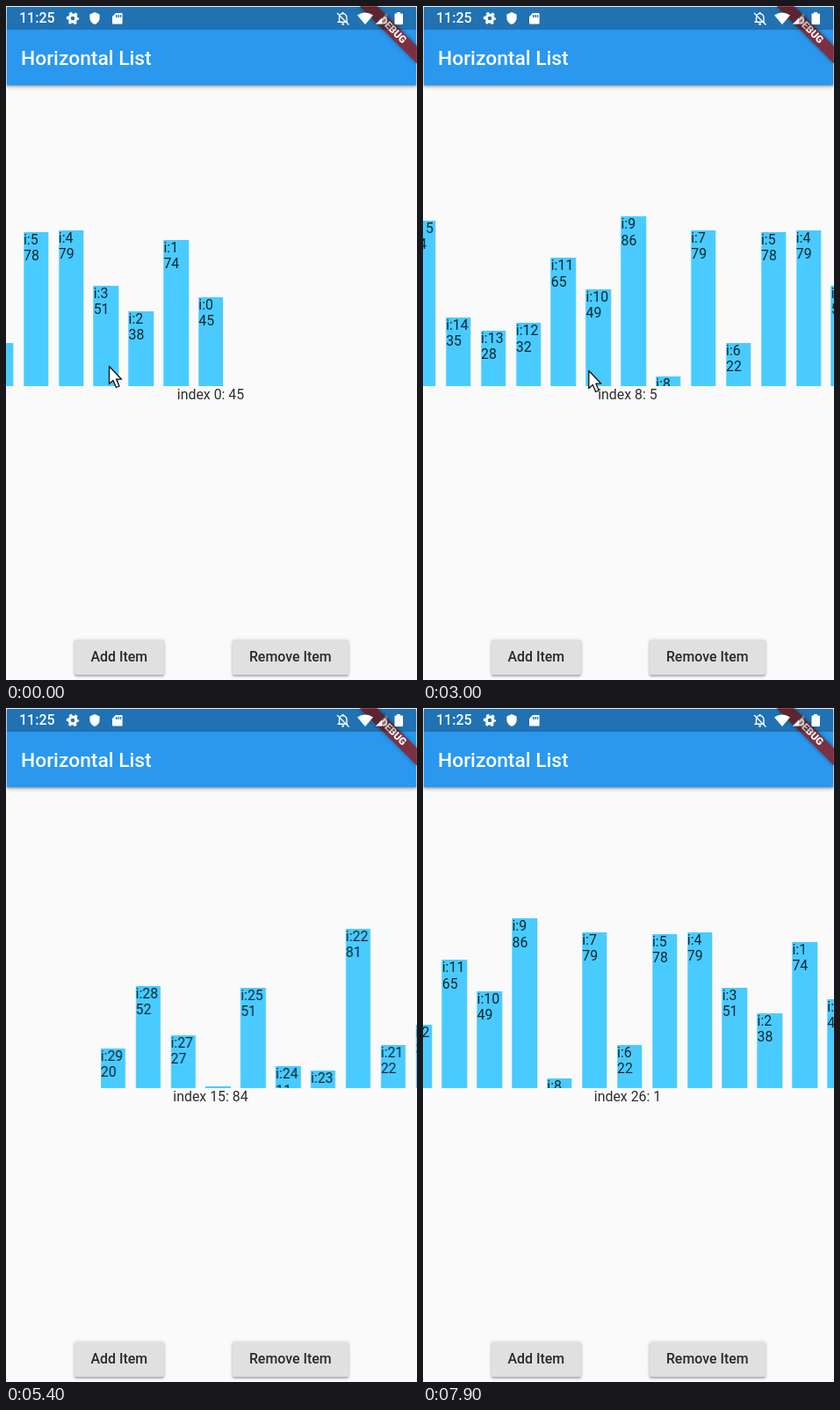
Animation, 468 px wide and 766 px high, one loop 8000 ms. Source, as an HTML page:

```html
<!DOCTYPE html>
<html lang="en">
<head>
<meta charset="utf-8">
<title>Horizontal List</title>
<style>
  html, body { margin: 0; width: 100%; height: 100%; overflow: hidden; background: #fafafa; }
  #stage {
    position: relative; width: 468px; height: 766px; overflow: hidden;
    background: #fafafa; color: rgba(0, 0, 0, .82);
    font: 15.9px/18.2px Roboto, sans-serif;
  }
  #stage > * { position: absolute; }
  .appbar {
    left: 1px; top: 1px; width: 466px; height: 89px; background: #2a98ee;
    box-shadow: 0 2px 4px rgba(0, 0, 0, .28), 0 1px 2px rgba(0, 0, 0, .2);
  }
  .title { left: 17px; top: 29px; color: #fff; font-size: 22.75px; font-weight: 500; line-height: 62px; white-space: nowrap; }
  .banner {
    left: 395.1px; top: 20.6px; width: 91px; height: 13.6px; transform: rotate(45deg);
    background: linear-gradient(#b71c1ca0, #b71c1ca0), rgba(0, 0, 0, .45);
    box-shadow: 0 0 5px rgba(0, 0, 0, .4);
    color: #fff; font-size: 11.6px; font-weight: 900; line-height: 13.6px; text-align: center;
  }
  .status { left: 1px; top: 1px; width: 466px; height: 26px; background: rgba(0, 0, 0, .25); }
  .clock { left: 15px; top: 5px; color: #fff; font-size: 16px; font-weight: 500; }
  #strip { left: 0; top: 0; width: 0; height: 432px; will-change: transform; }
  .bar { position: absolute; bottom: 0; width: 28.4px; overflow: hidden; background: #49cbff; white-space: pre; }
  #label { left: 0; top: 433px; width: 466px; text-align: center; }
  .button {
    top: 720px; height: 40px; line-height: 40px; border-radius: 2px; background: #e0e0e0;
    font-weight: 500; text-align: center; white-space: nowrap;
    box-shadow: 0 2px 2px rgba(0, 0, 0, .2), 0 1px 4px rgba(0, 0, 0, .2);
  }
  #cursor { left: 0; top: 0; overflow: visible; }
</style>
</head>
<body>
<div id="stage">
  <div id="strip"></div>
  <div id="label"></div>
  <div class="appbar"></div>
  <div class="title">Horizontal List</div>
  <div class="banner">DEBUG</div>
  <div class="status"></div>
  <div class="clock">11:25</div>
  <svg width="468" height="27" style="left:0;top:0" fill="#fff">
    <g fill="none" stroke="#fff">
      <circle cx="76" cy="14" r="3.9" stroke-width="3.2"/>
      <circle cx="76" cy="14" r="6" stroke-width="2.4" stroke-dasharray="3.1 3.183" stroke-dashoffset="1.5"/>
    </g>
    <path d="M101 7l5.6 2.4v4c0 3.4-2.4 6.4-5.6 7.4c-3.2-1-5.6-4-5.6-7.4v-4z"/>
    <path fill-rule="evenodd" d="M125 8h6.6q1 0 1 1v10.600q0 1-1 1h-9.600q-1 0-1-1v-7.600zM125 10v3h1.400v-3zM127.400 10v3h1.400v-3zM129.800 10v3h1.400v-3z"/>
    <g fill="none" stroke="#fff" stroke-width="1.4">
      <path d="M379.500 18.300v-5.300q0-4 4-4.400q4.500.4 4.500 4.900v4.800M377.500 18.300h11.500M377 8l13.500 13.500"/>
      <path d="M382.300 20.500h2.600M383.600 7v1.500" stroke-width="2"/>
    </g>
    <path d="M400 10.500q9-6 18 0l-9 10.500z"/>
    <path d="M434 7.500v13h-13z" opacity=".3"/>
    <path d="M428 13.500v7h-7z"/>
    <path d="M445 7h4v1.500h2q1 0 1 1v10.500q0 1-1 1h-7.500q-1 0-1-1v-10.500q0-1 1-1h1.500z"/>
  </svg>
  <div class="button" style="left:78px;width:101.500px">Add Item</div>
  <div class="button" style="left:258px;width:131.500px">Remove Item</div>
  <svg id="cursor" width="16" height="26">
    <path d="M.5 .5V20.500L5 16.400L8.400 24.500L12 23L8.600 15.200H14.600Z" fill="#fff" stroke="#111" stroke-width="1.300" stroke-linejoin="round"/>
  </svg>
</div>
<script>
const LOOP = 8000, STEP = 100;
const PITCH = 39.87, UNIT = 2.24, HOME = 219.3;
const APPROACH = 600, PULL = 1.4;
const $ = id => document.getElementById(id);

const values = [
  45, 74, 38, 51, 79, 78, 22, 79, 5, 86, 49, 65, 32, 28, 35, 84, 99,
  84, 29, 52, 32, 22, 81, 9, 11, 51, 1, 27, 52, 20, 61, 86, 40
];

// Each swipe carries the list until item `to` is centred.
// The pointer comes in from the right at `enter` and grabs at x, y.
const swipes = [
  { start: 100, length: 880, to: 8, enter: -APPROACH, x: 117, y: 409 },
  { start: 2642, length: 1248, to: 15, enter: 1400, x: 124, y: 414 },
  { start: 4500, length: 900, to: 26.2, enter: 3900, x: 130, y: 420 },
  { start: 5400, length: 300, to: 26 },
  { start: 7206, length: 1053, to: 0, enter: 5900, x: 355, y: 403 }
];
const grabs = swipes.filter(s => 'x' in s);

const clamp = u => Math.min(1, Math.max(0, u));
const mix = (a, b, u) => a + (b - a) * u;
const ease = u => u < .5 ? 2 * u * u : 1 - 2 * (1 - u) ** 2;

// Left edge of item 0
function scroll(t) {
  const item = swipes.reduce((at, s) => mix(at, s.to, ease(clamp((t - s.start) / s.length))), 0);
  return HOME + item * PITCH;
}

function pointer(t) {
  const g = grabs.filter(s => s.enter <= t).pop();
  const near = ease(clamp((t - g.enter) / APPROACH));
  const pulled = t > g.start ? PULL * (scroll(t) - scroll(g.start)) : 0;
  return [mix(484, g.x, near) + pulled, mix(g.y + 50, g.y, near)];
}

const selectedAt = t => t < 1000 ? 0 : t < 3600 ? 8 : t < 5500 ? 15 : 26;
const loadedAt = t => t < 2200 ? 10 : t < 6700 ? 30 : values.length;

const bars = values.map((value, i) => {
  const bar = document.createElement('div');
  bar.className = 'bar';
  bar.style.left = -i * PITCH + 'px';
  bar.style.height = value * UNIT + 'px';
  bar.textContent = `i:${i}\n${value}`;
  $('strip').append(bar);
  return bar;
});

function draw(t) {
  const index = selectedAt(t), count = loadedAt(t), [x, y] = pointer(t);
  $('strip').style.transform = `translateX(${scroll(t)}px)`;
  bars.forEach((bar, i) => { bar.style.display = i < count ? '' : 'none'; });
  $('label').textContent = `index ${index}: ${values[index]}`;
  $('cursor').style.transform = `translate(${x}px, ${y}px)`;
}

const start = performance.now();
function tick() {
  const t = (performance.now() - start) % LOOP;
  draw(Math.floor(t / STEP) * STEP);
  requestAnimationFrame(tick);
}
tick();
</script>
</body>
</html>
```
